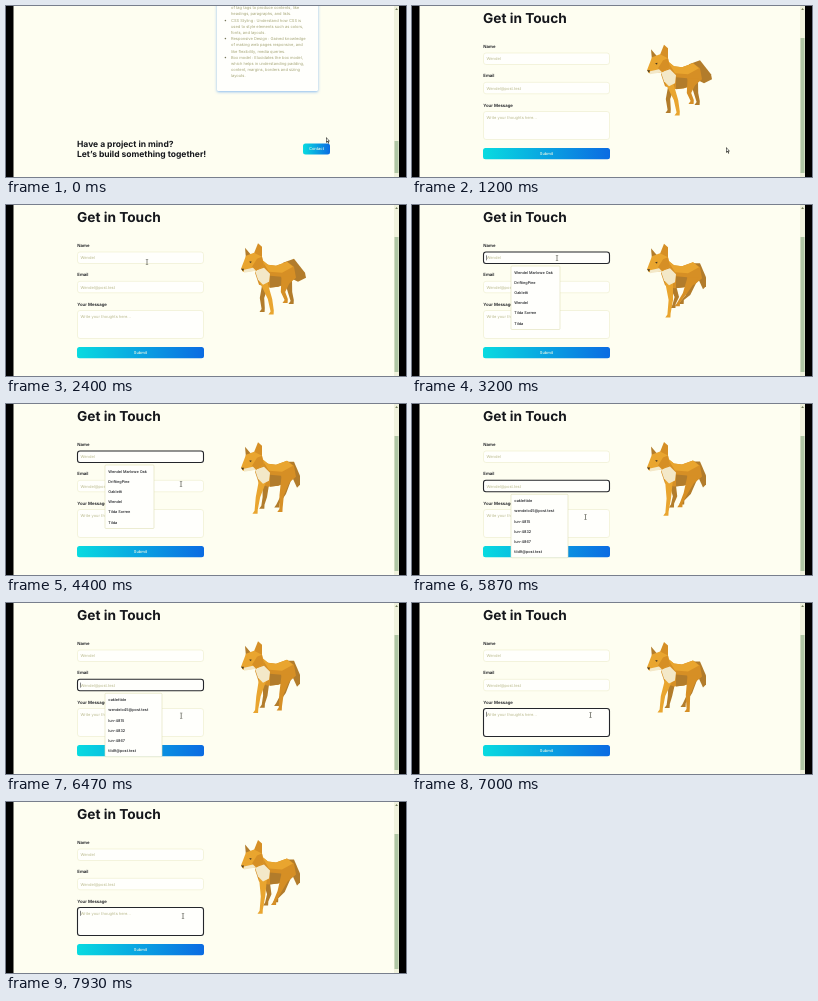
An HTML page with a canvas for the animation above (8 s loop, 400 px wide and 171 px high).

```html
<!DOCTYPE html>
<html lang="en">
<head>
<meta charset="utf-8">
<title>Contact form</title>
<style>
html, body { margin: 0; width: 100%; height: 100%; overflow: hidden; background: #000; }
canvas { display: block; width: 100vw; height: 100vh; }
</style>
</head>
<body>
<canvas></canvas>
<script>
const W = 400, H = 171, LOOP = 8000;
const PAGE = '#fefef1', INK = '#15171c', FAINT = '#b9b98c';
const OPEN_PAGE = 700, FOX_IN = 1000, WALK = 2730, WALK_CYCLE = 685;
const canvas = document.querySelector('canvas');
const ctx = canvas.getContext('2d');

const clamp = x => Math.max(0, Math.min(1, x));
const mix = (a, b, k) => a + (b - a) * k;
const smooth = k => k * k * (3 - 2 * k);
const ease = (t, from, to) => smooth(clamp((t - from) / (to - from)));

function text(str, x, y, size, color = INK, weight = 400, align = 'left') {
  ctx.font = `${weight} ${size}px Inter, sans-serif`;
  ctx.textAlign = align;
  ctx.fillStyle = color;
  ctx.fillText(str, x, y);
}

function box(x, y, w, h, r, fill, stroke, line = 0.6) {
  ctx.beginPath();
  ctx.roundRect(x, y, w, h, r);
  ctx.fillStyle = fill;
  ctx.fill();
  if (!stroke) return;
  ctx.strokeStyle = stroke;
  ctx.lineWidth = line;
  ctx.stroke();
}

function button(label, x, y, w, h) {
  const g = ctx.createLinearGradient(x, 0, x + w, 0);
  g.addColorStop(0, '#08dbe0');
  g.addColorStop(1, '#0b6be2');
  box(x, y, w, h, 2.5, g);
  text(label, x + w / 2, y + h / 2 + 1.4, 4, '#f4fbe4', 500, 'center');
}

function poly(color, ...p) {
  ctx.beginPath();
  for (let i = 0; i < p.length; i += 2) ctx.lineTo(p[i], p[i + 1]);
  ctx.closePath();
  ctx.fillStyle = color;
  ctx.fill();
}

function scrollbar(top) {
  ctx.fillStyle = '#f0f2dd';
  ctx.fillRect(388, 0, 5, H);
  ctx.fillStyle = '#afc6a4';
  ctx.fillRect(388.5, top, 4, 167 - top);
  poly('#77805f', 389.2, 4, 390.6, 2, 392, 4);
}

function homePage() {
  ctx.save();
  ctx.shadowColor = '#8bbcf0';
  ctx.shadowBlur = 3;
  ctx.shadowOffsetY = 1;
  box(211, -20, 101, 105, 1.5, '#fffffc');
  ctx.restore();
  const lines = [
    'of tag tags to produce contents, like', 'headings, paragraphs, and lists.',
    '•CSS Styling : Understand how CSS is', 'used to style elements such as colors,', 'fonts, and layouts.',
    '•Responsive Design : Gained knowledge', 'of making web pages responsive, and', 'like flexibility, media queries.',
    '•Box model : Elucidates the box model,', 'which helps in understanding padding,', 'content, margins, borders and sizing', 'layouts.'
  ];
  lines.forEach((line, i) => {
    const y = 3.2 + i * 6.2;
    if (line[0] === '•') text('•', 218, y, 5, '#77775a');
    text(line.replace('•', ''), 225, y, 4, '#a5a576');
  });
  text('Have a project in mind?', 71, 141, 8.5, INK, 700);
  text('Let’s build something together!', 71, 151, 8.5, INK, 700);
  button('Contact', 297, 137.5, 27, 11);
  scrollbar(135);
}

const fields = [
  { label: 'Name', hint: 'Wendel', y: 47, h: 11.5, from: 2730, to: 4880,
    list: ['Wendel Marlowe Oak', 'DriftingPine', 'Oakletti', 'Wendel', 'Tilda Sorren', 'Tilda'], listW: 49 },
  { label: 'Email', hint: 'Wendel@post.test', y: 76.3, h: 11.5, from: 4980, to: 6480,
    list: ['oaklettide', 'wendelo45@post.test', 'lun-4815', 'lun-4832', 'lun-4867', 'tild9@post.test'], listW: 57 },
  { label: 'Your Message', hint: 'Write your thoughts here...', y: 105.5, h: 28, from: 6550, to: LOOP }
];

function form(t) {
  text('Get in Touch', 71, 17, 13.7, INK, 700);
  let active;
  for (const f of fields) {
    const focused = t >= f.from && t < f.to;
    if (focused) active = f;
    text(f.label, 71.3, f.y - 4.9, 4.3, INK, 600);
    box(71.5, f.y, 126, f.h, 2.5, '#fffffc', focused ? '#24262b' : '#ececcb', focused ? 1.1 : 0.6);
    text(f.hint, 74.5, f.y + 7.2, 4, FAINT);
    if (focused && (t - f.from) % 1060 < 530) {
      ctx.fillStyle = INK;
      ctx.fillRect(74, f.y + 3.3, 0.5, 5);
    }
  }
  button('Submit', 71, 142, 127, 11.2);
  if (active && active.list) {
    const top = active.y + 14;
    box(99, top, active.listW, 63.5, 1, '#fffffc', '#dfdfb8');
    active.list.forEach((item, i) => text(item, 102.3, top + 8 + i * 10.1, 3.8, INK, 500));
  }
}

// Tapered from the hip down to a small paw pointing left
function leg(color, width, [hipX, hipY], [kneeX, kneeY], [footX, footY]) {
  poly(color,
    hipX - width / 2, hipY, kneeX - 2.2, kneeY, footX - 1.4, footY - 3, footX - 3.5, footY,
    footX + 1.6, footY, footX + 1.8, footY - 4, kneeX + 2.2, kneeY, hipX + width / 2, hipY);
}

function fox(t) {
  const walk = ease(t, WALK, WALK + 250);
  const phase = 2 * Math.PI * ((t - 3200) / WALK_CYCLE - 0.1);
  const spread = smooth(0.5 - 0.5 * Math.cos(phase));
  const bob = mix(0.4 * Math.sin(t / 450), 0.6 * Math.cos(2 * phase), walk);
  const light = '#e9a52f', mid = '#d68f25', dark = '#b27c2b', cream = '#f3e8c8';

  // Joint position: standing, legs together, legs apart
  const joint = (stand, together, apart) =>
    stand.map((v, i) => mix(v, mix(together[i], apart[i], spread), walk));
  const part = (color, ...p) => poly(color, ...p.map((v, i) => i % 2 ? v + bob : v));

  // Far legs
  leg(dark, 8, [282, 74 + bob], joint([284, 87], [276, 90], [278, 90]), joint([286, 99], [270, 99], [272, 104]));
  leg(dark, 7, [260, 78 + bob], joint([256, 93], [265, 92], [258, 93]), joint([257, 107], [262, 103], [256, 105]));

  // Tail
  part(dark,
    mix(277, 282, walk), 58, mix(288, 288, walk), mix(54, 58, walk),
    mix(299, 294, walk), mix(68, 72, walk), mix(300, 294, walk), mix(73, 81, walk),
    mix(292, 291, walk), mix(77, 84, walk), mix(284, 286, walk), 73);

  // Body
  part(mid, 254, 54, 262, 60, 270, 61, 281, 57, 288, 62, 290, 73, 283, 79, 272, 82, 262, 83, 253, 80, 249, 68);
  part(light, 255, 54, 262, 60, 270, 61, 281, 57, 287, 62, 276, 68, 263, 67);
  part(dark, 264, 71, 275, 72, 279, 79, 272, 82, 264, 83);

  // Near legs
  leg(mid, 11, [281, 72 + bob], joint([277, 87], [273, 88], [276, 92]), joint([280, 98], [266, 101], [276, 109]));
  leg(light, 8, [257, 76 + bob], joint([264, 94], [259, 95], [251, 93]), joint([266, 109.5], [257, 112.5], [249, 109.5]));
  part(cream, 249, 66, 258, 63, 264, 69, 263, 77, 257, 80, 252, 75);

  // Head
  part(dark, 239, 43, 245, 50, 240, 54);
  part(mid, 252, 38.5, 256, 42, 256, 54, 247, 51);
  part(light, 240, 51, 248, 48, 256, 52, 258, 61, 250, 66, 237, 67, 235, 64);
  part(mid, 251, 54, 256, 52, 258, 61, 250, 66, 246, 62);
  part(cream, 238, 65, 247, 63, 250, 66, 238, 68);
  part('#4a3a22', 235, 64, 238, 64, 237, 66.5);
  part('#4a3a22', 243, 57, 245.5, 56.5, 245, 58.5);
}

function contactPage(t) {
  form(t);
  if (t >= FOX_IN) fox(t);
  scrollbar(32);
}

// Pointer stops: departure, arrival, x, y
const stops = [
  [-1, 0, 320, 131], [80, 400, 314, 141], [1300, 1780, 302, 111], [1800, 2380, 141, 57],
  [2480, 2680, 145, 53], [3850, 4350, 175, 80], [5350, 5800, 173.5, 113],
  [6200, 6900, 178.5, 112], [7300, 7800, 177, 114]
];

function pointer(t) {
  let x = 0, y = 0;
  for (const [from, to, px, py] of stops) {
    const k = ease(t, from, to);
    x = mix(x, px, k);
    y = mix(y, py, k);
  }
  if (x > 198) {
    poly('#33342e', x, y, x, y + 6, x + 1.4, y + 4.8, x + 2.4, y + 6.8, x + 3.2, y + 6.3, x + 2.4, y + 4.4, x + 4, y + 4.2);
    poly('#fff', x + 0.6, y + 1.3, x + 0.6, y + 4.6, x + 2.7, y + 3.6);
    return;
  }
  ctx.fillStyle = '#55564c';
  ctx.fillRect(x - 0.35, y - 2.5, 0.7, 5);
  ctx.fillRect(x - 1.2, y - 2.9, 2.4, 0.5);
  ctx.fillRect(x - 1.2, y + 2.4, 2.4, 0.5);
}

function draw(t) {
  const dpr = devicePixelRatio || 1;
  const w = Math.round(innerWidth * dpr), h = Math.round(innerHeight * dpr);
  if (canvas.width !== w || canvas.height !== h) {
    canvas.width = w;
    canvas.height = h;
  }
  ctx.setTransform(w / W, 0, 0, h / H, 0, 0);
  ctx.textRendering = 'geometricPrecision';
  ctx.fillStyle = PAGE;
  ctx.fillRect(0, 0, W, H);
  if (t < OPEN_PAGE) homePage();
  else contactPage(t);
  pointer(t);
  ctx.fillStyle = '#000';
  ctx.fillRect(0, 0, 7.5, H);
  ctx.fillRect(393, 0, 7, H);
}

const start = performance.now();
function frame() {
  draw((performance.now() - start) % LOOP);
  requestAnimationFrame(frame);
}
frame();
</script>
</body>
</html>
```
